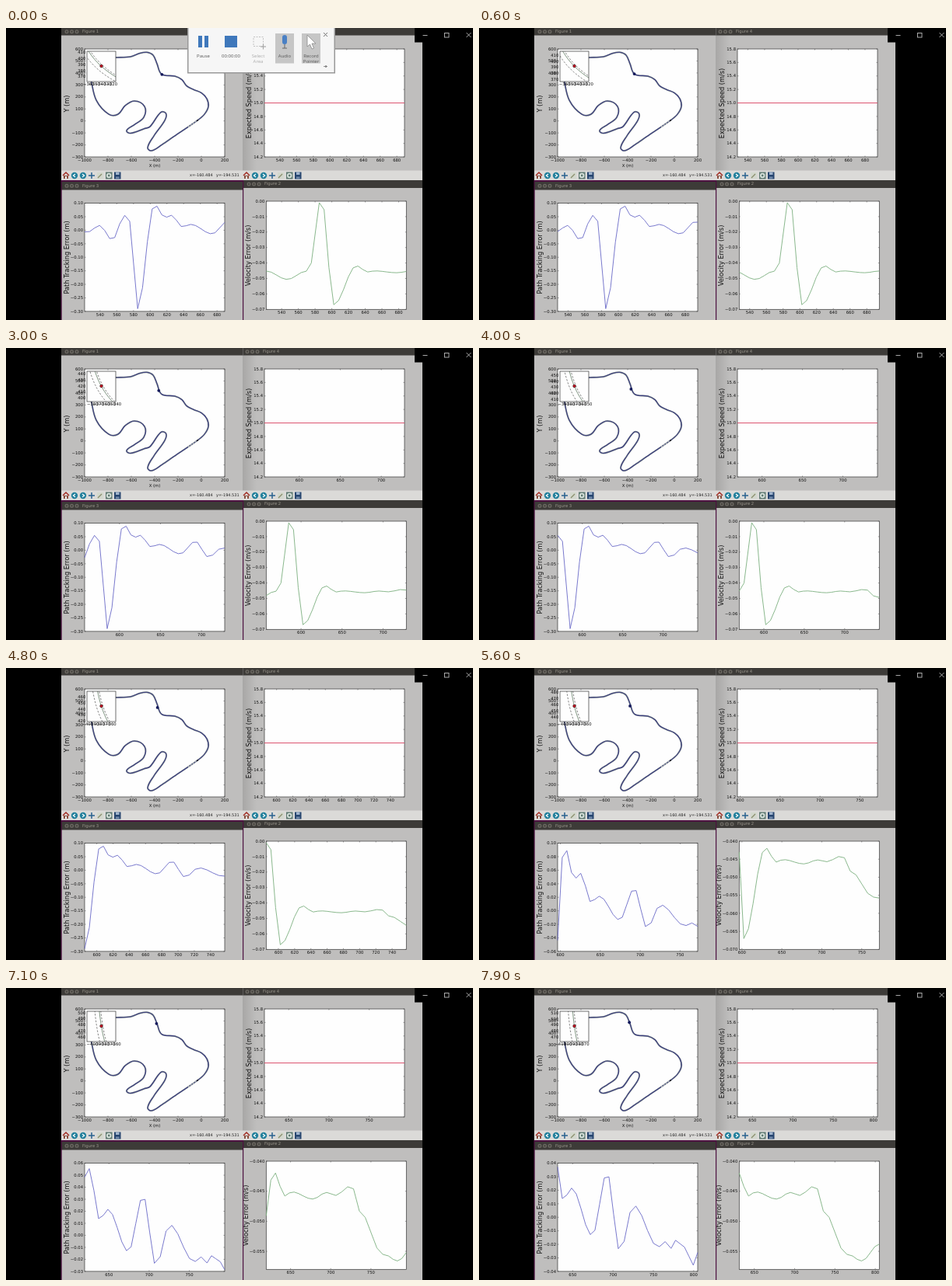
Write an HTML page with a canvas that moves like this. It is 600 px wide and 376 px high and loops after 8 s.

```html
<!DOCTYPE html>
<html>
<head>
<meta charset="utf-8">
<style>
html, body { margin: 0; width: 100%; height: 100%; overflow: hidden; background: #000 }
canvas { display: block }
</style>
</head>
<body>
<canvas id="c" width="600" height="376"></canvas>
<script>
const g = document.getElementById('c').getContext('2d');
const LOOP = 8000, SPAN = 28, FONT = '"DejaVu Sans", sans-serif';

const linear = f => f;
const smooth = f => (1 - Math.cos(f * Math.PI)) / 2;

// value at i between [i, value] keys
function between(keys, i, ease) {
  const n = Math.max(1, keys.findIndex(k => k[0] >= i));
  const [a, va] = keys[n - 1], [b, vb] = keys[n];
  return va + (vb - va) * ease(Math.max(0, (i - a) / (b - a)));
}
const sample = (keys, ease) => Array.from({ length: SPAN + 19 }, (_, i) => between(keys, i, ease));

// travelled metres and the two errors (in mm), one sample per index
const pos = sample([[0, 521.5], [9, 575.5], [10, 585], [31, 706.5], [40, 772], [46, 805]], linear);
const pathErr = sample([[0.7, -6], [3, 18], [5.5, -36], [8, 55], [9, 33], [10, -290], [13.35, 89], [14, 89],
  [15.5, 46], [17, 55.5], [19.2, 13], [21, 21.6], [25.4, -13.5], [28.6, 33], [31.3, -25], [33.6, 9],
  [37.8, -22], [39, -18], [40, -23], [41, -17], [43, -22], [45, -35.4], [46, -26]], smooth).map(v => v / 1000);
const velErr = sample([[0, -45.2], [4.2, -50.6], [8, -45.3], [9, -40], [10, -1], [11, -5.5], [12, -43], [13, -67],
  [17.7, -41.8], [20, -45.8], [21.5, -45.1], [26, -46.3], [29, -45.2], [31, -45.7], [33.3, -44.2], [34, -44.6],
  [35, -48.3], [39, -55.5], [42, -56.6], [46, -53.8]], smooth).map(v => v / 1000);

// samples arrive in a slightly uneven rhythm
const samplesAt = t =>
  Math.max(0, Math.floor(t / 427 - 0.35 - 0.66 * Math.cos((t - 4200) / 4800 * 2 * Math.PI)));

// road position in metres, d metres after the first sample
const roadAt = d => [-338 - 56 * (1 - Math.exp(-d / 60)), 387.5 + 0.8 * d + 0.0006 * d * d];

const track = [[141, 38], [160, 37], [172, 32.5], [181, 31.3], [189, 35], [194, 46], [200, 59.5], [217, 62],
  [226, 66.5], [232, 74.5], [241, 79.3], [251, 83.5], [258, 91], [260, 101], [255, 111], [246, 119], [216, 139.5],
  [200, 150.5], [187, 158], [182, 154], [190, 139], [204, 119], [205.5, 110], [199, 108.5], [185, 127], [178, 129.5],
  [160, 135.5], [155, 132], [165, 124.5], [177, 115], [178, 101], [165, 94], [153, 100], [144, 111], [132, 111],
  [116, 93], [109, 66]];

function rect(x, y, w, h, color) { g.fillStyle = color; g.fillRect(x, y, w, h); }

function dot(x, y, r, color) {
  g.fillStyle = color;
  g.beginPath(); g.arc(x, y, r, 0, 7); g.fill();
}

function line(pts, color, width = 0.8, dash = []) {
  g.strokeStyle = color; g.lineWidth = width; g.setLineDash(dash);
  g.beginPath();
  pts.forEach(p => g.lineTo(...p));
  g.stroke(); g.setLineDash([]);
}

function curve(p, color, width) {
  g.strokeStyle = color; g.lineWidth = width;
  g.beginPath(); g.moveTo(...p[0]);
  for (let i = 0; i < p.length - 1; i++) {
    const a = p[i - 1] || p[i], b = p[i], c = p[i + 1], d = p[i + 2] || c;
    // tangents scaled to the segment keep uneven spacing from overshooting
    const len = Math.hypot(c[0] - b[0], c[1] - b[1]) / 3;
    const u = Math.hypot(c[0] - a[0], c[1] - a[1]), v = Math.hypot(d[0] - b[0], d[1] - b[1]);
    g.bezierCurveTo(b[0] + (c[0] - a[0]) / u * len, b[1] + (c[1] - a[1]) / u * len,
      c[0] - (d[0] - b[0]) / v * len, c[1] - (d[1] - b[1]) / v * len, ...c);
  }
  g.stroke();
}

function frame(x, y, w, h, color, width = 0.7) {
  g.strokeStyle = color; g.lineWidth = width;
  g.strokeRect(x, y, w, h);
}

function text(s, x, y, size = 5.3, color = '#111', align = 'center', family = FONT) {
  g.font = size + 'px ' + family;
  g.fillStyle = color; g.textAlign = align; g.textBaseline = 'middle';
  g.fillText(s, x, y);
}

function upright(s, x, y) {
  g.save();
  g.translate(x, y); g.rotate(-Math.PI / 2);
  text(s, 0, 0, 8.2);
  g.restore();
}

const label = (v, digits) => (v < -1e-9 ? '−' : '') + Math.abs(v).toFixed(digits);

function ticks(lo, hi, step) {
  const out = [];
  for (let i = Math.ceil(lo / step - 1e-6); i * step <= hi + step * 1e-6; i++) out.push(i * step);
  return out;
}

// smallest 1-2-5 step that covers the range in nine intervals
function niceStep(lo, hi) {
  const unit = 10 ** Math.floor(Math.log10((hi - lo) / 9));
  return [1, 2, 5, 10].map(m => m * unit).find(s => Math.floor(lo / s) * s + 9 * s >= hi);
}

function axes(x, y, w, h, xr, yr, xStep, yStep, digits) {
  const px = v => x + (v - xr[0]) / (xr[1] - xr[0]) * w;
  const py = v => y + h - (v - yr[0]) / (yr[1] - yr[0]) * h;
  rect(x, y, w, h, '#fefefe');
  for (const v of ticks(...xr, xStep)) {
    const p = px(v);
    line([[p, y], [p, y + 1.5]], '#444', 0.5);
    line([[p, y + h], [p, y + h - 1.5]], '#444', 0.5);
    text(label(v, 0), p, y + h + 4.4);
  }
  for (const v of ticks(...yr, yStep)) {
    const p = py(v);
    line([[x, p], [x + 1.5, p]], '#444', 0.5);
    line([[x + w, p], [x + w - 1.5, p]], '#444', 0.5);
    text(label(v, digits), x - 2, p + 0.3, 5.3, '#111', 'right');
  }
  frame(x, y, w, h, '#333');
  return (a, b) => [px(a), py(b)];
}

function errorPlot(x, y, k, data, color) {
  const ys = data.slice(k, k + SPAN + 1), xs = pos.slice(k, k + SPAN + 1);
  const lo = Math.min(...ys), hi = Math.max(...ys), step = niceStep(lo, hi);
  const yr = [Math.floor(lo / step) * step, Math.ceil(hi / step) * step];
  const fine = step < 0.009;
  const at = axes(x, y, 180, 139.3, [xs[0], xs[SPAN]], yr, niceStep(xs[0], xs[SPAN]), fine ? 0.005 : step, fine ? 3 : 2);
  line(xs.map((v, i) => at(v, ys[i])), color, 0.9);
  return fine;
}

function titleBar(x, y, w, h, name, tx) {
  rect(x, y, w, h, '#3d3b38');
  const cy = y + h / 2;
  for (let i = 0; i < 3; i++) {
    dot(tx - 20 + i * 6.5, cy, 2.5, '#6c6963');
    dot(tx - 20 + i * 6.5, cy, 1.2, '#46443f');
  }
  text(name, tx, cy, 5.3, '#99958b', 'left');
}

function toolbar(x) {
  const y = 190;
  line([[x - 4, y], [x, y - 4], [x + 4, y]], '#a22b22', 1.5);
  rect(x - 3, y, 6, 4, '#8a5040'); rect(x - 1, y + 1, 2, 3, '#eee');
  for (const [dx, s] of [[11, -1], [22, 1]]) {
    dot(x + dx, y, 4.2, '#23809c');
    line([[x + dx - s, y - 2], [x + dx + s * 1.6, y], [x + dx - s, y + 2]], '#fff', 1.2);
  }
  line([[x + 29, y], [x + 37, y]], '#28618f', 1.5);
  line([[x + 33, y - 4], [x + 33, y + 4]], '#28618f', 1.5);
  rect(x + 40, y - 4, 8, 8, '#d3d8cd');
  line([[x + 41, y + 3], [x + 46, y - 2]], '#8a8d6c', 1.2);
  rect(x + 51, y - 4.5, 8.5, 9, '#5f7a72');
  dot(x + 55.2, y, 3.2, '#d8e2dc'); dot(x + 55.2, y, 1.4, '#5f7a72');
  rect(x + 62, y - 4.5, 8.5, 9, '#27456f');
  rect(x + 64, y - 4.5, 4.5, 3.5, '#9fb3cc'); rect(x + 64, y + 1.5, 4.5, 3, '#6f87a8');
}

function inset(d) {
  const x = 104, y = 30, w = 37, h = 39, mx = 122.5, my = 49.3;
  const [cx, cy] = roadAt(d);
  const px = v => mx + (v - cx) * 0.74, py = v => my - (v - cy) * 0.78;
  rect(x, y, w, h, '#fefefe');
  g.save();
  g.beginPath(); g.rect(x, y, w, h); g.clip();
  const lane = (dx, dy) => Array.from({ length: 13 }, (_, i) => {
    const [a, b] = roadAt(d + (i - 6) * 7);
    return [px(a) + dx, py(b) + dy];
  });
  line(lane(-5.5, 3), '#555', 0.7, [2.5, 1.8]);
  line(lane(1.8, -1), '#555', 0.7, [2.5, 1.8]);
  line(lane(0, 0), '#4c6a50', 0.7);
  g.restore();
  frame(x, y, w, h, '#333');
  for (const v of ticks(cx - 25, cx + 25, 10)) text(label(v, 0), px(v), 72.2);
  for (const v of ticks(cy - 25, cy + 25, 10)) text(label(v, 0), 102.3, py(v), 5.3, '#111', 'right');
  dot(mx, my - 0.3, 2.1, '#300'); dot(mx, my - 0.3, 1.4, '#d3152a');
}

function trackFigure(k) {
  const at = axes(101, 27, 180, 139, [-1000, 200], [-300, 600], 200, 100, 0);
  const d = pos[k + SPAN] - pos[SPAN];
  text('X (m)', 191, 177.3);
  upright('Y (m)', 79, 97.5);
  curve(track, '#8b988f', 2);
  curve(track, '#3a3b82', 1.1);
  line([[234, 127.4], [246, 119]], '#c9cfc0', 1.2, [2, 1.5]);
  dot(246, 119, 1, '#222');
  dot(...at(...roadAt(d)), 1.9, '#141a5c');
  inset(d);
}

function recorder(dy) {
  const ui = (s, x, y, c = '#555') => text(s, x, y, 6, c, 'center', '"Open Sans", sans-serif');
  g.save();
  g.translate(0, dy);
  rect(233, 0, 190, 58.5, '#999');
  rect(234.5, 0, 187, 57, '#f6f6f6');
  rect(247, 10, 5, 15, '#3f78bb'); rect(255, 10, 5, 15, '#3f78bb');
  ui('Pause', 253.5, 36);
  rect(281, 10, 16, 15, '#3f78bb');
  ui('00:00:00', 289, 36);
  g.setLineDash([2, 1.5]); frame(318, 11.5, 12.5, 12, '#bbb', 0.9); g.setLineDash([]);
  line([[327, 24], [334, 24]], '#aaa', 1.2); line([[330.5, 20.5], [330.5, 27.5]], '#aaa', 1.2);
  ui('Select', 324, 36, '#aaa'); ui('Area', 324, 43, '#aaa');
  rect(346, 7, 24, 38.5, '#c6c6c6'); rect(380, 7, 24, 38.5, '#c6c6c6');
  line([[358, 12], [358, 18]], '#4a80c4', 6);
  dot(358, 12, 3, '#4a80c4'); dot(358, 18, 3, '#4a80c4');
  line([[358, 21], [358, 26]], '#666', 1); line([[355, 26], [361, 26]], '#666', 1);
  ui('Audio', 358, 36);
  g.fillStyle = '#fff'; g.strokeStyle = '#888'; g.lineWidth = 0.8;
  g.beginPath();
  [[387, 9], [387, 24], [390.5, 21], [393, 27], [395.5, 26], [393, 20], [398, 20]].forEach(p => g.lineTo(...p));
  g.closePath(); g.fill(); g.stroke();
  ui('Record', 392, 36); ui('Pointer', 392, 43);
  line([[408, 6], [413, 11]], '#666', 0.9); line([[413, 6], [408, 11]], '#666', 0.9);
  line([[408, 49.5], [413, 49.5]], '#777', 0.8); line([[411, 48], [411, 51]], '#777', 1.3);
  g.restore();
}

function draw(t) {
  const k = samplesAt(t);
  rect(0, 0, 600, 376, '#000');
  rect(71, 0, 464, 376, '#bfbebd');
  const shade = g.createLinearGradient(304, 0, 322, 0);
  shade.addColorStop(0, 'rgba(0,0,0,0.12)');
  shade.addColorStop(1, 'rgba(0,0,0,0)');
  rect(304, 9, 18, 175, shade);

  titleBar(71, 0, 233.5, 9.5, 'Figure 1', 98);
  titleBar(304.5, 0, 230.5, 9.5, 'Figure 4', 330);
  rect(71, 183.5, 464, 12.5, '#dbdad8');
  toolbar(77); toolbar(309);
  text('x=-160.484', 236, 189.7, 5, '#222', 'left');
  text('y=-194.531', 270, 189.7, 5, '#222', 'left');
  trackFigure(k);

  const xr = [pos[k], pos[k + SPAN]];
  const at = axes(332, 27, 180, 139, xr, [14.2, 15.8], niceStep(...xr), 0.2, 1);
  line([at(xr[0], 15), at(xr[1], 15)], '#dc5470', 1);
  upright('Expected Speed (m/s)', 313, 97);

  rect(71, 196, 234, 2, '#4d1140');
  titleBar(71, 198, 233.5, 10.5, 'Figure 3', 98);
  titleBar(305, 196, 230, 10, 'Figure 2', 332);
  errorPlot(101, 225.6, k, pathErr, '#6a6ac8');
  upright('Path Tracking Error (m)', 78.6, 295.5);
  rect(70.5, 196, 1.2, 180, '#4d1140'); rect(304, 196, 1.2, 180, '#4d1140');
  const fine = errorPlot(334.3, 223, k, velErr, '#7db080');
  g.save();
  g.beginPath(); g.rect(305, 206, 230, 170); g.clip();
  upright('Velocity Error (m/s)', fine ? 309 : 312, 293);
  g.restore();

  if (t < 300) recorder(-Math.max(0, t - 100) * 0.3);

  rect(525, 0, 75, 18.5, '#000');
  line([[535.5, 9.5], [541.5, 9.5]], '#bbb', 0.9);
  frame(563.5, 6.5, 5.5, 5.5, '#bbb', 0.9);
  line([[591.5, 6], [597.5, 12]], '#bbb', 0.9);
  line([[597.5, 6], [591.5, 12]], '#bbb', 0.9);
}

const start = performance.now();
function tick() {
  const t = (performance.now() - start) % LOOP;
  draw(Math.floor(t / 100) * 100);
  requestAnimationFrame(tick);
}
tick();
</script>
</body>
</html>
```
